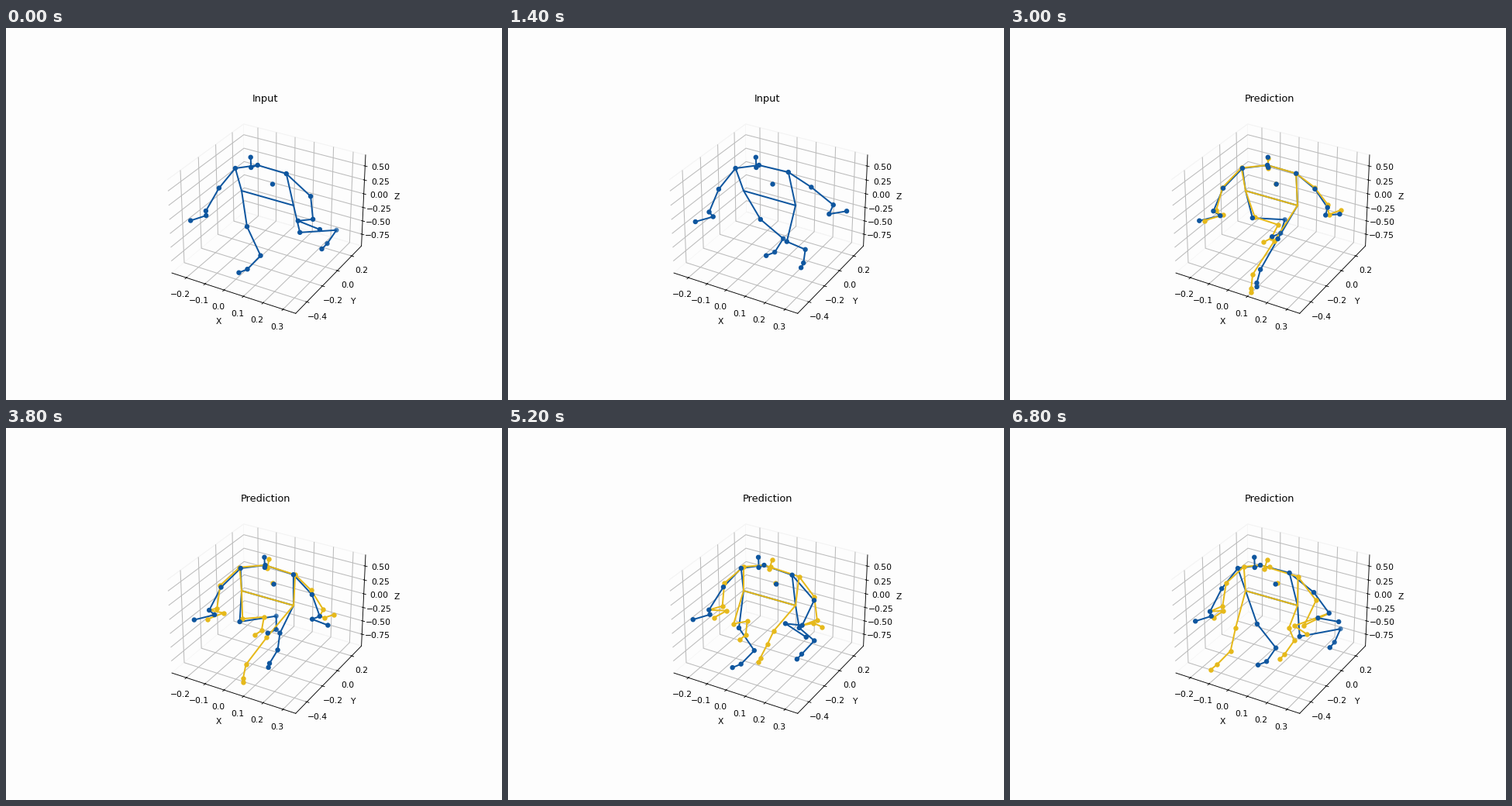
Animation of 640 by 480 pixels, one loop 7 s. Source, as a matplotlib script:

```python
import numpy as np
import matplotlib.pyplot as plt
from matplotlib.animation import FuncAnimation
from matplotlib.colors import to_rgba

W, H, DPI = 640, 480, 80
FRAMES, INTERVAL = 35, 200
CYCLE = 6.25    # seconds per gait cycle
SWITCH = 2.0    # the prediction starts here,
TEMPO = 0.67    # walks more slowly than the truth
SETTLE = 3.0    # and drifts to its own posture within this time
PAPER, BLUE, GOLD = "#fdfdfd", "#0e569f", "#e6b91b"
HIPS = {"hip_l": (304, 210), "hip_r": (371, 229)}

plt.rcParams.update({
    "font.size": 9.63, "axes.labelpad": 3, "grid.linewidth": 0.95,
    "grid.color": "#bcbcbc", "xtick.major.pad": 3.1, "ytick.major.pad": 3.1})

JOINTS = {}


def joint(name, parent, rest, cos=(0, 0), sin=(0, 0), bend=(0, 0),
          drift=(0, 0)):
    """A bone in stage pixels that swings once, and bends twice, per cycle."""
    JOINTS[name] = parent, np.array([rest, cos, sin, bend, drift], float)


joint("spine", None, (344, 201.5), sin=(-2.5, 0), drift=(-1, -2))
joint("thorax", None, (328.7, 177), (-4, 0), (-4.3, 0), drift=(5, 2))
joint("neck", "thorax", (-3.7, 3), (-4.8, 0), (1, 0))
joint("head", "neck", (-0.5, -13.2), drift=(4, 1))

joint("shoulder_l", "thorax", (-30.5, 4), (1.7, 0), drift=(-4, -4))
joint("elbow_l", "shoulder_l", (-23, 25.5), (2, 0), (1, 1.5), drift=(0, -3))
joint("wrist_l", "elbow_l", (-15, 29.5), (-2, 0), (3, 0), drift=(14, 0))
joint("hand_l", "wrist_l", (4.5, 6), (-4.2, 0), (1.4, 0))
joint("tip_l", "hand_l", (-23.5, 6.5), (3.5, 0), drift=(9, 2.5))

joint("shoulder_r", "thorax", (37, 11), sin=(1, -2))
joint("elbow_r", "shoulder_r", (27.7, 25), (3.7, 4.2), (1.3, -6.4),
      drift=(-5, -2))
joint("wrist_r", "elbow_r", (9.4, 27), (-6.4, 2.6), (18, -4.6), (7, 0))
joint("hand_r", "wrist_r", (-11.3, 5.5), (-8, -3.5), (7.3, 7), drift=(9, 3))
joint("tip_r", "hand_r", (23.2, 5.6), (4.9, 5.6), (-1.3, -10.5),
      drift=(-11, -7))

joint("knee_l", "hip_l", (7, 41), (0, 5.3), (15, -5), drift=(-7, 0))
joint("ankle_l", "knee_l", (30.5, 18.4), (-13, 19), (-1, 5.8), (6, -7.5),
      drift=(-26, 0))
joint("foot_l", "ankle_l", (-10.5, 17.5), (-6.5, 0), (-1, 0), (5, 0))
joint("toe_l", "foot_l", (-11, 4.5), drift=(3, 2))

joint("knee_r", "hip_r", (-8.3, 38.4), (16.5, -3.6), (-5.7, 8.9),
      drift=(-16, 0))
joint("ankle_r", "knee_r", (13.5, 17), (33.7, -20), (1.4, 0), (11, -11),
      drift=(-13, 0))
joint("foot_r", "ankle_r", (-8.7, 17.3), (-3.2, 0), (6.9, 0), drift=(4, 0))
joint("toe_r", "foot_r", (-3.5, 6), (-3.5, 1), (1, 0))


def pose(t, drift=0):
    """All joint positions at time t, each built on its parent."""
    w = 2 * np.pi * t / CYCLE
    weights = np.array([1, np.cos(w), np.sin(w), np.sin(2 * w), drift])
    at = {name: np.array(hip, float) for name, hip in HIPS.items()}
    for name, (parent, terms) in JOINTS.items():
        at[name] = at.get(parent, 0) + weights @ terms
    return at


def predicted(t):
    """The true gait at a slower pace, easing into a drifted posture."""
    u = np.clip((t - SWITCH) / SETTLE, 0, 1)
    return pose(SWITCH + TEMPO * (t - SWITCH), u * u * (3 - 2 * u))


def bones(at, ref):
    """Skeleton polyline; the duplicate thorax and wrists come from ref."""
    gap = (np.nan, np.nan)
    path = [at["head"], at["neck"], at["thorax"], gap,
            at["hip_l"], at["hip_r"], gap]
    for side in ("_l", "_r"):
        path += [ref["thorax"]]
        path += [at[j + side] for j in ("shoulder", "elbow", "wrist")]
        path += [ref["wrist" + side], at["hand" + side], at["tip" + side], gap]
        path += [at[j + side]
                 for j in ("shoulder", "hip", "knee", "ankle", "foot", "toe")]
        path += [gap]
    return np.array(path).T


def dots(at):
    return np.array([at[name] for name in JOINTS])


def shade(at):
    """Dot colours: a foot swung to the back looks paler."""
    rgba = {name: list(to_rgba(BLUE)) for name in JOINTS}
    for side in ("_l", "_r"):
        reach = at["ankle" + side][0] - at["knee" + side][0]
        back = np.clip((reach - 18) / 25, 0, 1)
        rgba["ankle" + side][3] = 1 - 0.4 * back
        rgba["foot" + side][3] = 1 - 0.2 * back
    return list(rgba.values())


fig = plt.figure(figsize=(W / DPI, H / DPI), dpi=DPI, facecolor=PAPER)

# Empty 3D box with its grid
box = fig.add_subplot(projection="3d", facecolor=PAPER)
box.set_position([192.6 / W, 93.8 / H, 284.3 / W, 284.3 / H])
box.view_init(elev=30, azim=-60)
box.set(xlim=(-0.278, 0.362), ylim=(-0.539, 0.341), zlim=(-0.973, 0.695),
        xlabel="X", ylabel="Y", zlabel="Z",
        xticks=np.arange(-2, 4) / 10, yticks=np.arange(-2, 2) / 5,
        zticks=np.arange(-3, 3) / 4)
for axis in (box.xaxis, box.yaxis, box.zaxis):
    axis.set_pane_color(to_rgba(PAPER))
    axis.pane.set_edgecolor("#f3f3f3")
title = box.set_title("Input")

# Flat layer in stage pixels for the skeletons
stage = fig.add_axes([0, 0, 1, 1])
stage.set(xlim=(0, W), ylim=(H, 0))
stage.axis("off")


def skeleton(color, line_z, dot_z):
    line, = stage.plot([], [], color=color, lw=1.8, zorder=line_z)
    marks = stage.scatter([], [], s=18.5, color=color, lw=1.45, zorder=dot_z)
    return line, marks


true_line, true_dots = skeleton(BLUE, 2, 5)
guess_line, guess_dots = skeleton(GOLD, 3, 4)


def draw(n):
    t = n * INTERVAL / 1000
    predicting = t >= SWITCH
    title.set_text("Prediction" if predicting else "Input")

    truth = pose(t)
    true_line.set_data(*bones(truth, truth))
    true_dots.set_offsets(dots(truth))
    true_dots.set_color(shade(truth))

    guess_line.set_visible(predicting)
    guess_dots.set_visible(predicting)
    if predicting:
        guess = predicted(t)
        guess_line.set_data(*bones(guess, truth))
        guess_dots.set_offsets(dots(guess))
    return title, true_line, true_dots, guess_line, guess_dots


anim = FuncAnimation(fig, draw, frames=FRAMES, interval=INTERVAL,
                     repeat=True, repeat_delay=0, blit=False)
plt.show()
```
